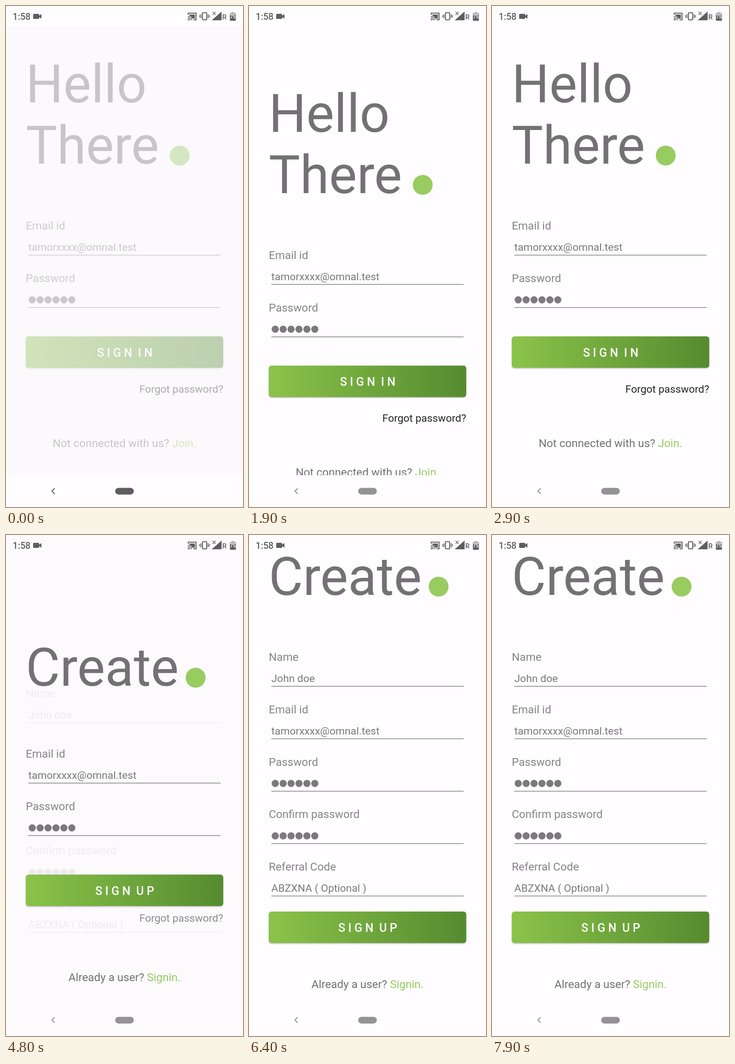
Recreate the animation shown at these times as an HTML page with a canvas. Size 515 px wide and 1087 px high, loop 8 s.

```html
<!DOCTYPE html>
<html lang="en">
<head>
<meta charset="utf-8">
<title>Sign in and sign up</title>
<style>
  html, body { margin: 0; width: 100%; height: 100%; overflow: hidden; background: #fffdff; }
  canvas { display: block; width: 515px; height: 1087px; }
</style>
</head>
<body>
<canvas id="stage"></canvas>
<script>
const W = 515, H = 1087, LOOP = 8000, STEP = 100;
const TOP = 44, BOTTOM = 1018;
const LEFT = 43, RIGHT = 472;
const ROW = 113.75;
const FONT = 'Roboto, sans-serif';
const TITLE_SIZE = 114.1, LABEL_SIZE = 24.25, VALUE_SIZE = 22.85, BUTTON_SIZE = 25.3;
const PAGE = '#fffdff';
const INK = '#737174', LABEL = '#868488', VALUE = '#7b797c', GREEN = '#98cc61', ICON = '#5f5d60';
const EMAIL = 'tamorxxxx@omnal.test';

const canvas = document.getElementById('stage');
const ctx = canvas.getContext('2d');
const dpr = window.devicePixelRatio || 1;
canvas.width = W * dpr;
canvas.height = H * dpr;

// Content offset: [time, y]
const SCROLL = [
  [0, 0], [1400, 0], [1780, 92], [2100, 0],
  [2200, 0], [2580, -85], [2900, 0],
  [5700, 0], [5800, -55.5], [6050, -140], [6400, -79],
  [6500, -79], [6850, 46], [7100, 0],
  [7400, 0], [7500, -9], [7600, -90], [7700, -125], [7900, -79], [8000, -79]
];
const MORPH_START = 4735, MORPH_TIME = 300;

const clamp = v => Math.min(1, Math.max(0, v));
const ease = u => (1 - Math.cos(Math.PI * clamp(u))) / 2;
const mix = (a, b, u) => a + (b - a) * u;

function track(keys, t) {
  const i = Math.max(1, keys.findIndex(k => k[0] >= t));
  const [t0, a] = keys[i - 1], [t1, b] = keys[i];
  return mix(a, b, ease((t - t0) / (t1 - t0)));
}

function text(str, x, y, size, color, align = 'left', weight = 400) {
  ctx.font = `${weight} ${size}px ${FONT}`;
  ctx.textAlign = align;
  ctx.fillStyle = color;
  ctx.fillText(str, x, y);
}

function disc(x, y, r, color) {
  ctx.fillStyle = color;
  ctx.beginPath();
  ctx.arc(x, y, r, 0, Math.PI * 2);
  ctx.fill();
}

function box(x, y, w, h, r, color) {
  ctx.fillStyle = color;
  ctx.beginPath();
  ctx.roundRect(x, y, w, h, r);
  ctx.fill();
}

function poly(points, color) {
  ctx.fillStyle = color;
  ctx.beginPath();
  points.forEach(([x, y]) => ctx.lineTo(x, y));
  ctx.closePath();
  ctx.fill();
}

function stroke(width, color, path) {
  ctx.lineWidth = width;
  ctx.strokeStyle = color;
  ctx.beginPath();
  path();
  ctx.stroke();
}

function withAlpha(a, draw) {
  if (a <= 0) return;
  ctx.save();
  ctx.globalAlpha = a;
  draw();
  ctx.restore();
}

// A field without a value shows password dots.
function field(label, value, y) {
  text(label, LEFT, y, LABEL_SIZE, LABEL);
  if (value) text(value, 48.5, y + 46, VALUE_SIZE, VALUE);
  else for (let i = 0; i < 6; i++) disc(57 + i * 17.2, y + 38.6, 7.8, VALUE);
  ctx.fillStyle = VALUE;
  ctx.fillRect(48.5, y + 54.6, 418, 1.4);
}

function button(label, y) {
  const fill = ctx.createLinearGradient(LEFT, 0, RIGHT, 0);
  fill.addColorStop(0, '#8bc34a');
  fill.addColorStop(1, '#558b2f');
  ctx.save();
  ctx.shadowColor = 'rgba(0,0,0,.27)';
  ctx.shadowBlur = 3 * dpr;
  ctx.shadowOffsetY = 1.5 * dpr;
  box(LEFT, y, RIGHT - LEFT, 68.3, 6, fill);
  ctx.restore();
  text(label, 258, y + 44, BUTTON_SIZE, '#fff', 'center', 500);
}

// Question and link, centred together
function footer(question, link, y) {
  ctx.font = `${LABEL_SIZE}px ${FONT}`;
  const full = ctx.measureText(question + link).width;
  const x = (W - full) / 2;
  const linkX = x + ctx.measureText(question).width;
  text(question, x, y, LABEL_SIZE, INK);
  text(link, linkX, y, LABEL_SIZE, GREEN);
}

const forgot = () => text('Forgot password?', RIGHT, 838.5, VALUE_SIZE, '#252428', 'right');

function signIn() {
  text('Hello', LEFT, 209, TITLE_SIZE, INK);
  text('There', LEFT, 342, TITLE_SIZE, INK);
  disc(377.5, 324.5, 21.6, GREEN);
  field('Email id', EMAIL, 485.2);
  field('Password', '', 599);
  button('S I G N  I N', 716.7);
  forgot();
  footer('Not connected with us? ', 'Join.', 956.5);
}

function signUp(p) {
  const first = 352;
  const titleY = mix(342, 208.5, p);
  withAlpha(p, () => {
    field('Name', 'John doe', first);
    field('Confirm password', '', first + 3 * ROW);
    field('Referral Code', 'ABZXNA ( Optional )', first + 4 * ROW);
  });
  text('Create', LEFT, titleY, TITLE_SIZE, INK);
  disc(412, titleY - 17.5, 21.6, GREEN);
  field('Email id', EMAIL, mix(485.2, first + ROW, p));
  field('Password', '', mix(599, first + 2 * ROW, p));
  button('S I G N  U P', mix(716.7, 896, p));
  withAlpha(1 - p * 4.3, forgot);
  footer('Already a user? ', 'Signin.', mix(956.5, 1061.5, p));
}

function castIcon() {
  box(398.5, 18.5, 12, 9, 0, ICON);
  disc(395, 31, 10.5, PAGE);
  stroke(2, ICON, () => {
    ctx.moveTo(396, 19);
    ctx.lineTo(396, 15.5);
    ctx.lineTo(413, 15.5);
    ctx.lineTo(413, 30);
    ctx.lineTo(407.5, 30);
  });
  for (const r of [5, 8.7]) {
    stroke(1.8, ICON, () => ctx.arc(395, 31, r, -Math.PI / 2, 0));
  }
  disc(396.3, 29.7, 1.5, ICON);
}

function statusBar() {
  text('1:58', 14.5, 30, 19.7, ICON, 'left', 500);
  box(59, 17, 13, 11, 1.5, ICON);
  poly([[71, 21.5], [77, 17.5], [77, 27.5], [71, 23.5]], ICON);
  castIcon();

  // vibrate
  stroke(2, ICON, () => ctx.roundRect(427, 14.5, 9, 15.5, 1));
  for (const [d, h] of [[7.7, 9], [10.7, 5]]) {
    for (const side of [-1, 1]) box(431.5 + side * d - 0.9, 22.2 - h / 2, 1.8, h, 0, ICON);
  }

  // signal, roaming, battery
  poly([[447, 31], [468.5, 12], [468.5, 31]], ICON);
  stroke(1.3, ICON, () => {
    ctx.moveTo(449, 12.5); ctx.lineTo(455.5, 19.5);
    ctx.moveTo(455.5, 12.5); ctx.lineTo(449, 19.5);
  });
  text('R', 474.8, 29, 15, ICON, 'center', 500);
  box(490, 13, 6, 3, 0.5, '#b9b7ba');
  box(486.5, 15, 13, 17, 1.5, ICON);
  box(486.5, 15, 13, 4.5, [1.5, 1.5, 0, 0], '#b9b7ba');
  text('75', 493, 27, 11, '#fff', 'center', 500);
}

function navBar(color) {
  stroke(2, color, () => {
    ctx.moveTo(105.8, 1046.5);
    ctx.lineTo(99.8, 1052.5);
    ctx.lineTo(105.8, 1058.5);
  });
  box(237.3, 1045.5, 40.4, 14.4, 7.2, color);
}

function draw(t) {
  const veil = clamp(0.63 - t * 0.0038);
  const progress = (t - MORPH_START) / MORPH_TIME;
  const morphing = progress > 0 && progress < 1;

  ctx.setTransform(dpr, 0, 0, dpr, 0, 0);
  ctx.fillStyle = morphing ? '#fcfafd' : PAGE;
  ctx.fillRect(0, 0, W, H);

  ctx.save();
  ctx.beginPath();
  ctx.rect(0, TOP, W, (morphing ? H : BOTTOM) - TOP);
  ctx.clip();
  ctx.translate(0, track(SCROLL, t));
  if (progress > 0) signUp(ease(progress));
  else signIn();
  ctx.restore();

  // The sign-in page fades in from under a pale sheet.
  withAlpha(veil, () => box(0, TOP, W, BOTTOM - TOP, 0, '#f9f7fb'));

  statusBar();
  navBar(t < 800 ? '#5f5d60' : '#949295');
}

const start = performance.now();
function tick() {
  const ms = (performance.now() - start) % LOOP;
  draw(Math.floor(ms / STEP) * STEP);
  requestAnimationFrame(tick);
}
tick();
</script>
</body>
</html>
```
